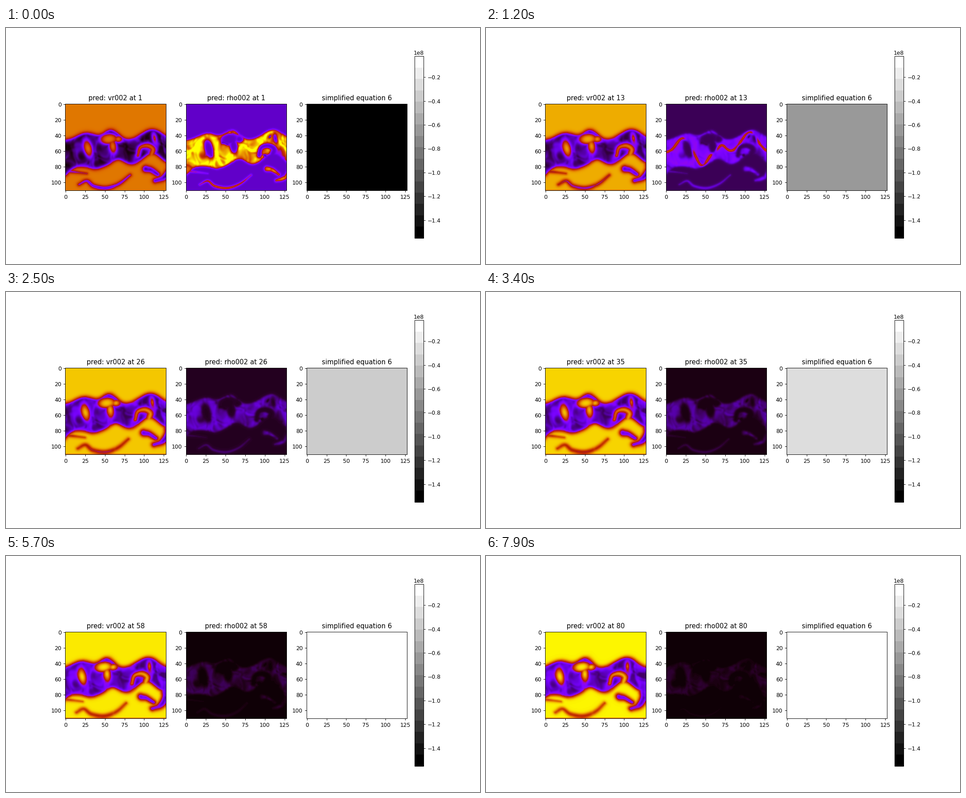
Write a matplotlib script that moves like this. It is 1058 px wide and 529 px high and loops after 8000 ms.

```python
import numpy as np
import matplotlib.pyplot as plt
from matplotlib.animation import FuncAnimation

W, H, PAD, FRAMES = 128, 111, 16, 80
VMIN, VMAX = -1.55e8, -.025e8
x, y = np.meshgrid(np.arange(W + PAD, dtype=float), np.arange(H, dtype=float))


def waves(base, *humps):
    """A level line with smooth humps (height, centre, width)."""
    return base + sum(h * np.exp(-((x - c) / w)**2) for h, c, w in humps)


def above(line):
    """Approximate distance to a level line, positive above it."""
    return (line - y) / np.hypot(1, np.gradient(line, axis=1))


def ellipse(cx, cy, a, b, tilt=0):
    c, s = np.cos(tilt), np.sin(tilt)
    u, v = (x - cx) * c + (y - cy) * s, (y - cy) * c - (x - cx) * s
    return (np.hypot(u / a, v / b) - 1) * min(a, b)


def strand(points, r0, r1, taper=0):
    """Distance to a Catmull-Rom curve whose radius runs from r0 to r1."""
    p = np.array(points, float)
    p = np.vstack([2 * p[0] - p[1], p, 2 * p[-1] - p[-2]])
    best, spans = np.full(x.shape, 1e3), len(p) - 3
    for s in np.linspace(0, spans, 24 * spans + 1):
        i = min(int(s), spans - 1)
        f = s - i
        a, b, c, d = p[i:i + 4]
        px, py = .5 * (2 * b + (c - a) * f + (2 * a - 5 * b + 4 * c - d) * f**2
                       + (3 * b - a - 3 * c + d) * f**3)
        u = s / spans
        r = r0 + (r1 - r0) * u - taper * (1 - np.sin(np.pi * u))
        best = np.minimum(best, np.hypot(x - px, y - py) - r)
    return best


def noise(rng, low, high, count, u, v):
    total = np.zeros_like(u)
    for _ in range(count):
        k, a, ph = 2 * np.pi / rng.uniform(low, high), *rng.uniform(0, 2 * np.pi, 2)
        total += np.sin(k * (np.cos(a) * u + np.sin(a) * v) + ph)
    return total / np.sqrt(count / 2)


def soft(d, width):
    return 1 / (1 + np.exp(np.clip(d / width, -40, 40)))


# Mixing layer, negative distance inside
top = waves(47, (-9.5, 27, 17), (-13, 58, 13), (-14, 110, 19))
bottom = waves(80, (12, -3, 10), (3, 38, 9), (-9, 67, 12), (-17, 110, 17))
layer = np.maximum(above(top), -above(bottom))
holes = [
    ellipse(28.5, 57, 5, 11, -.25),
    ellipse(55, 45, 11, 6.5, -.1),
    ellipse(60, 54, 4.5, 9, -.15),
    ellipse(67, 45, 5, 4),
    ellipse(113, 44, 2, 5, -.2),
    strand([(92, 66), (95, 56), (104, 53.5), (111, 58), (109, 68), (114, 80)], 2, 4),
]
for hole in holes:
    layer = np.maximum(layer, -hole)
hook = strand([(134, 62), (134, 74), (133, 84), (125, 94), (114, 98)], 6, 1.8)
blob = strand([(102, 83), (109, 84.5), (117, 90)], 3.4, 2)
layer = np.minimum(layer, np.minimum(hook, blob))
wisp = np.minimum(
    strand([(17, 103), (27, 98.5), (36, 105), (52, 107.5), (68, 102), (82, 91)],
           1.4, 1.4, 1.2),
    strand([(0, 86), (12, 87), (27, 89)], .8, -.6))

rng = np.random.default_rng(6)
wx = x + 2.5 * noise(rng, 16, 32, 8, x, y)
wy = y + 2.5 * noise(rng, 16, 32, 8, x, y)
coarse = noise(rng, 15, 30, 14, wx, wy)
fine = noise(rng, 6, 12, 16, wx, wy)

# Bright thread through the layer, and the ring of the left vortex
thread = np.abs(above(waves(62, (-18, 22, 11), (17, 47, 9), (-9, 72, 7), (-26, 107, 14))))
ring = np.abs(ellipse(21, 60, 17, 17))
near = np.minimum(thread, ring)

cover = soft(layer - .5, 1.25)
wisp_cover = soft(wisp - .6, 1.1)
mottle = np.clip(.45 + .24 * coarse + .09 * fine, 0, 1)**1.5
streak = np.clip(.45 * np.exp(-(near / 6)**2) + .4 + .16 * coarse + .12 * fine, 0, 1)
gap = 1 - .7 * np.exp(-((x - 117)**2 + (y - 63)**2) / 70)
body = soft(layer + .8, .8) * gap
wisp_body = soft(wisp + .3, .7)
line = np.exp(-(thread / 1.7)**2) * soft(layer + .3, .6)

# Flow to the left, fastest in the middle of the layer
drift = 10.5 / (FRAMES - 1) * np.exp(-((np.arange(H) - 62) / 45)**2)


def advect(field, t):
    cols, full = np.arange(W), np.arange(W + PAD)
    return np.array([np.interp(cols + v * t, full, row)
                     for v, row in zip(drift, field)])


def velocity(t):
    back = 1 - .06 * np.exp(-t / 6) - .165 * np.exp(-t / 33)
    grown = 1 - np.exp(-t / 20)
    core = .01 + .06 * grown + (.13 + .07 * grown) * advect(mottle, t)
    mask = np.maximum(advect(cover, t), (.95 - .35 * grown) * advect(wisp_cover, t))
    v = back + (core - back) * mask
    v[-1] -= .2 * grown * (v[-1] > .3)
    return np.clip(v, 0, 1)


def density(t):
    back = .005 + .14 * np.exp(-t / 12.2)
    gain = .6 * np.exp(-t / 5) + .28 * np.exp(-t / 34)
    glow = .4 * np.exp(-((t - 8) / 9)**2)
    shape = advect(body, t)**(1 + t / 80) * advect(streak, t)**(.35 + t / 60)
    shape = np.maximum(shape, .75 * np.exp(-t / 60) * advect(wisp_body, t))
    return np.clip(back + gain * shape + glow * advect(line, t), 0, 1)


def residual(t):
    return np.full((H, W), VMAX - (VMAX - VMIN) * (1 + t / 26.5)**-2.5)


fig, axes = plt.subplots(1, 3, figsize=(12, 6), dpi=88.17)
fig.subplots_adjust(left=.125, right=.8462, bottom=.11, top=.88, wspace=.2)
blank = np.zeros((H, W))
vr_im, rho_im = [ax.imshow(blank, cmap="gnuplot", vmin=0, vmax=1) for ax in axes[:2]]
eq_im = axes[2].imshow(blank, cmap=plt.get_cmap("gray", 16), vmin=VMIN, vmax=VMAX)
for ax in axes:
    ax.set_xticks(range(0, 126, 25))
    ax.set_yticks(range(0, 101, 20))
axes[2].set_title("simplified equation 6")
fig.colorbar(eq_im, cax=fig.add_axes([912 / 1058, .11, 20.35 / 1058, .77]))


def draw(i):
    vr_im.set_data(velocity(i))
    rho_im.set_data(density(i))
    eq_im.set_data(residual(i))
    for ax, name in zip(axes, ("vr002", "rho002")):
        ax.set_title(f"pred: {name} at {i + 1}")
    return vr_im, rho_im, eq_im


anim = FuncAnimation(fig, draw, frames=FRAMES, interval=100, repeat=True, repeat_delay=0)
plt.show()
```
